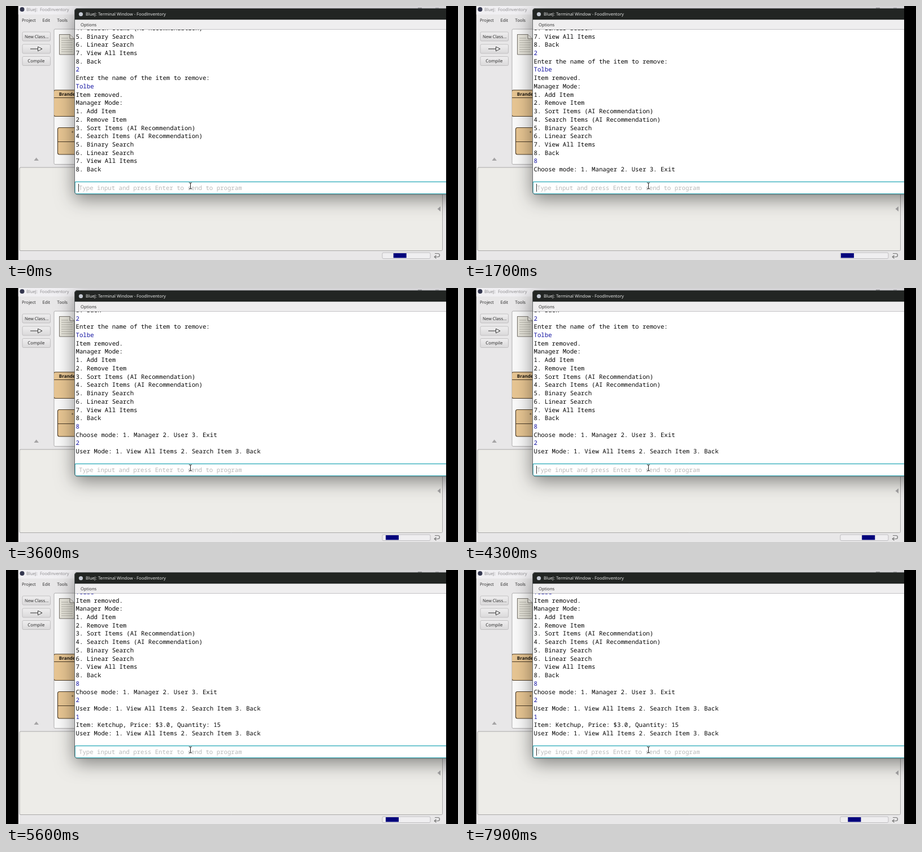
Recreate the animation shown at these times as an HTML page with a canvas. Size 800x450 px, loop 8 s.

```html
<!DOCTYPE html>
<html lang="en">
<head>
<meta charset="utf-8">
<title>Terminal session</title>
<style>
html, body { margin: 0; width: 100%; height: 100%; overflow: hidden; background: #000; }
canvas { display: block; width: 800px; height: 450px; }
</style>
</head>
<body>
<canvas id="stage" width="800" height="450"></canvas>
<script>
const ctx = document.getElementById('stage').getContext('2d');
const UI = '"Open Sans", "Noto Sans", sans-serif';
const MONO = '"Noto Sans Mono", "DejaVu Sans Mono", monospace';
const LOOP = 8000, STEP = 100;
const INK = '#050505', INPUT = '#1010a0';

const menu = [
  'Manager Mode:', '1. Add Item', '2. Remove Item', '3. Sort Items (AI Recommendation)',
  '4. Search Items (AI Recommendation)', '5. Binary Search', '6. Linear Search',
  '7. View All Items', '8. Back'
];
const userMode = 'User Mode: 1. View All Items 2. Search Item 3. Back';
// A leading '>' marks what the user typed.
const start = [...menu.slice(4), '>2', 'Enter the name of the item to remove:', '>Tolbe', 'Item removed.', ...menu];
const replies = [
  { at: 1400, lines: ['>8', 'Choose mode: 1. Manager 2. User 3. Exit'] },
  { at: 2800, lines: ['>2', userMode] },
  { at: 4600, lines: ['>1', 'Item: Ketchup, Price: $3.0, Quantity: 15', userMode] }
];

function rect(x, y, w, h, fill, stroke, r = 0, lw = 1) {
  ctx.beginPath();
  ctx.roundRect(x, y, w, h, r);
  if (fill) { ctx.fillStyle = fill; ctx.fill(); }
  if (stroke) { ctx.strokeStyle = stroke; ctx.lineWidth = lw; ctx.stroke(); }
}

function path(points, stroke, fill, lw = 1) {
  ctx.beginPath();
  points.forEach(([x, y], i) => i ? ctx.lineTo(x, y) : ctx.moveTo(x, y));
  if (fill) { ctx.fillStyle = fill; ctx.fill(); }
  if (stroke) { ctx.strokeStyle = stroke; ctx.lineWidth = lw; ctx.stroke(); }
}

function dot(x, y, r, fill) {
  ctx.beginPath();
  ctx.arc(x, y, r, 0, Math.PI * 2);
  ctx.fillStyle = fill;
  ctx.fill();
}

function text(str, x, y, color, size = 7.65, family = UI, weight = 400) {
  ctx.font = `${weight} ${size}px ${family}`;
  ctx.fillStyle = color;
  ctx.fillText(str, x, y);
}

function button(y) {
  const g = ctx.createLinearGradient(0, y, 0, y + 16);
  g.addColorStop(0, '#efeeef');
  g.addColorStop(1, '#dad9da');
  rect(29, y, 49.5, 16, g, '#b8b7b8', 2, 0.8);
}

function classBox(x, y, h, split) {
  rect(x, y, 60, h, '#e7c592', '#4a3a26', 3, 1.1);
  path([[x, split], [x + 60, split]], '#4a3a26');
}

function drawMain() {
  rect(21.5, 0, 757.5, 450, '#e8e7e8');
  rect(21.5, 0, 757.5, 15, '#f0eff2');
  dot(28.5, 6, 4, '#34374f');
  text('BlueJ:  FoodInventory', 36, 9.2, '#8c8b8e');
  rect(729, 3, 7, 1, '#9a9a9c');
  rect(760, 3, 6, 1, '#b5b5b8');
  text('Project', 28, 28, '#252525');
  text('Edit', 64.5, 28, '#252525');
  text('Tools', 90.5, 28, '#252525');

  [46, 68, 89.5].forEach(button);
  text('New Class...', 33, 56.8, '#252525');
  path([[43, 76], [57, 76]], '#333');
  path([[56.5, 72.2], [64, 76], [56.5, 79.8], [56.5, 72.2]], '#333', '#f4f4f4');
  text('Compile', 38.3, 100.4, '#252525', 7.8);
  path([[49.5, 274], [53.7, 268.5], [58, 274]], null, '#a5a4a5');

  rect(85, 41, 688, 239.5, '#fafafa', '#b0afb0', 2);
  path([[94.5, 50.5], [113, 50.5], [121, 58], [121, 86], [94.5, 86], [94.5, 50]], '#77736c', '#e8e6dc');
  path([[113, 50.5], [113, 58], [121, 58]], '#77736c', '#f7f5ee');
  for (let y = 57; y < 83; y += 4) path([[98, y], [y < 60 ? 110 : 118, y]], '#a8a59c', null, 0.9);
  ctx.save();
  ctx.beginPath();
  ctx.rect(85, 41, 40, 239);
  ctx.clip();
  classBox(84.5, 149, 46.5, 162.5);
  text('Branded', 93.8, 158.6, '#1c1710', 8, UI, 700);
  classBox(91.5, 215.5, 47.5, 240.5);
  text('«', 116, 225, '#1c1710', 7);
  ctx.restore();

  rect(24, 286, 748.5, 147.5, '#edece8', '#a9a8a8', 2);
  path([[769, 355], [763.5, 359.5], [769, 364]], null, '#a5a4a5');
}

// The bar bounces at constant speed, one second each way.
function drawStatus(t) {
  rect(666, 437, 85, 10.5, '#efeef0', '#bebdc0', 2);
  const phase = ((t + 310) % 2000) / 1000;
  const left = 666.5 + 62 * (1 - Math.abs(1 - phase));
  rect(left, 438, 23, 8.2, '#00007c');
  ctx.beginPath();
  ctx.moveTo(759, 438.5);
  ctx.lineTo(764.5, 438.5);
  ctx.arc(764.5, 441.5, 3, -Math.PI / 2, Math.PI / 2);
  ctx.lineTo(758.5, 444.5);
  ctx.strokeStyle = '#777';
  ctx.lineWidth = 1.2;
  ctx.stroke();
  path([[761.5, 441.7], [758.2, 444.5], [761.5, 447.3]], '#777', null, 1.2);
}

function drawTerminal(t) {
  ctx.save();
  ctx.shadowColor = 'rgba(0,0,0,0.46)';
  ctx.shadowBlur = 32;
  ctx.shadowOffsetY = 8;
  rect(121, 4, 690, 330, '#fff', null, 5);
  ctx.restore();

  ctx.save();
  ctx.beginPath();
  ctx.roundRect(121, 4, 690, 330, 5);
  ctx.clip();
  rect(121, 4, 690, 20.5, '#222523');
  dot(132.5, 14.5, 3.6, '#c3c8d2');
  text('BlueJ: Terminal Window - FoodInventory', 141, 17.2, '#f2f2f2');
  rect(121, 24.5, 690, 17, '#efeeef');
  text('Options', 132, 36.2, '#252525');
  rect(121, 41, 690, 1, '#c4c4c6');

  const past = replies.filter(r => t >= r.at);
  const lines = start.concat(...past.map(r => r.lines));
  ctx.save();
  ctx.beginPath();
  ctx.rect(121, 42, 690, 268);
  ctx.clip();
  lines.forEach((line, i) => {
    const y = 293.2 - (lines.length - 1 - i) * 14.73;
    const typed = line[0] === '>';
    text(typed ? line.slice(1) : line, 123.5, y, typed ? INPUT : INK, 10.7, MONO, 500);
  });
  ctx.restore();

  rect(122, 311.5, 690, 21.2, '#fff', '#42b4c0', 2, 1.6);
  text('Type input and press Enter to send to program', 129, 326.1, '#b8b8b8', 10.7, MONO);

  // Each key press restarts the caret's blink once the key is up.
  const since = past.length ? t - past[past.length - 1].at - 100 : t;
  if (since < 0 || since % 1000 < 500) rect(128, 315, 1, 14, '#333');
  ctx.restore();
  rect(121.5, 4.5, 690, 329.3, null, '#55585a', 5, 0.9);

  path([[323.8, 313], [326.3, 313.8], [328.8, 313]], '#222');
  path([[326.5, 313.5], [326.5, 323.5]], '#222');
  path([[323.8, 324], [326.3, 323.2], [328.8, 324]], '#222');
}

function draw(t) {
  ctx.fillStyle = '#000';
  ctx.fillRect(0, 0, 800, 450);
  ctx.save();
  ctx.beginPath();
  ctx.rect(21.5, 0, 757.5, 450);
  ctx.clip();
  ctx.textRendering = 'geometricPrecision';
  drawMain();
  drawStatus(t);
  drawTerminal(t);
  ctx.restore();
}

const origin = performance.now();
let shown = -1;
function tick() {
  const elapsed = (performance.now() - origin) % LOOP;
  const t = Math.floor(elapsed / STEP) * STEP;
  if (t !== shown) draw(shown = t);
  requestAnimationFrame(tick);
}
tick();
</script>
</body>
</html>
```
